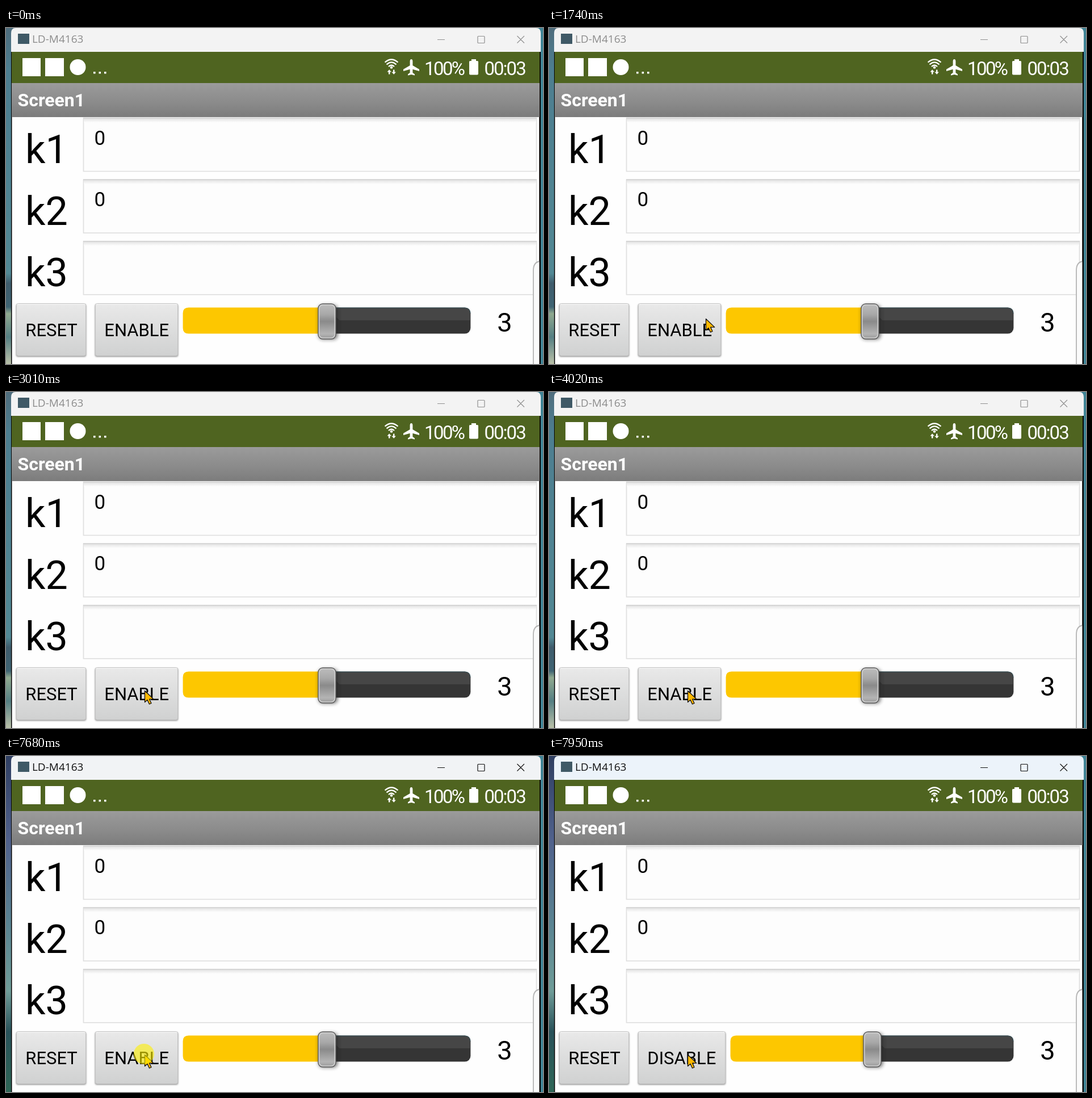
An HTML page for the animation above (8000 ms loop, 946x592 px).

```html
<!DOCTYPE html>
<html lang="en">
<head>
<meta charset="utf-8">
<title>Slider screen</title>
<style>
html, body { margin: 0; width: 100%; height: 100%; overflow: hidden; background: #fff; }
svg { display: block; width: 946px; height: 592px; }
text { font-family: Roboto, sans-serif; white-space: pre; }
.title { font: 19px "Open Sans", "Noto Sans", sans-serif; }
.status { font-size: 33px; fill: #fff; }
.label { font-size: 70px; }
.value { font-size: 35px; }
.caption { font-size: 31px; }
</style>
</head>
<body>
<svg id="stage" viewBox="0 0 946 592" xmlns="http://www.w3.org/2000/svg">
  <defs>
    <linearGradient id="deskIdle" x2="0" y2="1">
      <stop offset="0" stop-color="#4f6d7d"/><stop offset=".12" stop-color="#4d7e90"/>
      <stop offset=".73" stop-color="#528894"/><stop offset=".76" stop-color="#3f5c6c"/>
      <stop offset=".83" stop-color="#3f6473"/><stop offset=".85" stop-color="#8fa98f"/>
      <stop offset=".92" stop-color="#557f83"/><stop offset="1" stop-color="#b9c0a8"/>
    </linearGradient>
    <linearGradient id="deskLive" x2="0" y2="1">
      <stop offset="0" stop-color="#2f3f62"/><stop offset=".25" stop-color="#50618c"/>
      <stop offset=".5" stop-color="#5a8492"/><stop offset=".7" stop-color="#6f9c98"/>
      <stop offset=".82" stop-color="#29525a"/><stop offset="1" stop-color="#2f6656"/>
    </linearGradient>
    <linearGradient id="bar" x2="0" y2="1">
      <stop offset="0" stop-color="#9b9b9b"/><stop offset=".6" stop-color="#8a8a8a"/><stop offset="1" stop-color="#7c7c7c"/>
    </linearGradient>
    <linearGradient id="inset" x2="0" y2="1">
      <stop offset="0" stop-color="#e0e0e0"/><stop offset="1" stop-color="#fdfdfd"/>
    </linearGradient>
    <linearGradient id="button" x2="0" y2="1">
      <stop offset="0" stop-color="#e9e9e9"/><stop offset="1" stop-color="#d0d1d1"/>
    </linearGradient>
    <linearGradient id="knob" x2="0" y2="1">
      <stop offset="0" stop-color="#bdbdbd"/><stop offset=".3" stop-color="#a8a8a8"/>
      <stop offset=".5" stop-color="#8a8a8a"/><stop offset=".85" stop-color="#b4b4b4"/><stop offset="1" stop-color="#979797"/>
    </linearGradient>
    <filter id="soft" x="-50%" y="-20%" width="200%" height="140%"><feGaussianBlur stdDeviation="3"/></filter>
    <filter id="drop" x="-10%" y="-10%" width="120%" height="125%"><feGaussianBlur stdDeviation="1.4"/></filter>
  </defs>

  <rect width="946" height="592" fill="url(#deskIdle)"/>
  <rect id="live" width="946" height="592" fill="url(#deskLive)"/>
  <rect x="934" width="12" height="592" fill="#3f8496"/>
  <path id="frame" d="M9 43V9Q9 0 17 0H934Q942 0 942 9V43Z"/>
  <rect x="21" y="10" width="20" height="18" fill="#3f5966"/>
  <text class="title" id="name" x="46" y="26">LD-M4163</text>
  <path id="controls" d="M760 20.500H773M832 14.500H842Q843 14.500 843 15.500V25.500Q843 26.500 842 26.500H832Q831 26.500 831 25.500V15.500Q831 14.500 832 14.500ZM900.500 14L913 26.500M913 14L900.500 26.500" fill="none" stroke-width="1.200"/>

  <path d="M9 42H942V592H9Z" fill="#050505"/>
  <path d="M10.500 42H939.500V592H10.500Z" fill="#fefefe"/>
  <path d="M10 42H940V97H10Z" fill="#4f6420"/>
  <path d="M10 97H940V157H10Z" fill="url(#bar)"/>

  <g fill="#fff">
    <path d="M29 53H61V85H29ZM69 53H102V85H69Z"/>
    <circle cx="126.500" cy="69" r="14"/>
    <path d="M154 77h3.600v3.600h-3.600ZM163.500 77h3.600v3.600h-3.600ZM173 77h3.600v3.600h-3.600Z"/>
    <path d="M714 55q2.400 0 2.400 4v7l11.600 6.700v3.300l-11.600-3.300v6l3.600 2.700v2.100l-6-1.500-6 1.500v-2.100l3.600-2.700v-6l-11.600 3.300v-3.300l11.600-6.700v-7q0-4 2.400-4Z"/>
    <path d="M820 55h8v3h2.500q1.500 0 1.500 1.500v21q0 2-2 2h-12q-2 0-2-2v-21q0-1.500 1.500-1.500h2.500Z"/>
    <path d="M671.500 77.500l3.700-4.300 3.700 4.300h-2.500v4h-2.400v-4ZM679.500 77.500h2.500v-4h2.400v4h2.500l-3.700 4.300Z"/>
    <circle cx="679" cy="69.500" r="2.300"/>
    <path d="M667.500 60.500Q679 50.500 690.500 60.500M670.500 64.300Q679 56.500 687.500 64.300M674 68Q679 63 684 68" fill="none" stroke="#fff" stroke-width="2.300"/>
    <text x="20.500" y="138" font-size="32" font-weight="700">Screen1</text>
  </g>
  <text class="status" x="737" y="83" letter-spacing="-2.600">100%</text>
  <text class="status" x="842.500" y="83" letter-spacing="-2">00:03</text>

  <g id="fields"></g>
  <path d="M940 411Q929 413 929 427V592H940Z" fill="#fafafa"/>
  <path d="M940 411Q929 413 929 427V592" fill="none" stroke="#b4b4b4" stroke-width="1.800"/>
  <path d="M939.500 157V592H942V157Z" fill="#050505"/>

  <g id="buttons"></g>
  <g id="slider"></g>
  <text x="865.300" y="535.300" font-size="47">3</text>

  <path id="cursor" d="M.5 .5V20.500L5 16.400 8.500 24 12 22.400 8.700 15.100H15.800Z" fill="#ffb900" stroke="#111" stroke-width="1.300" stroke-linejoin="round"/>
  <circle id="press" cx="243" cy="525" r="18" fill="#fff000" opacity=".6"/>
</svg>
<script>
const LOOP = 8000, STEP = 67.5, ENTER = 980;
const FOCUS = 7680, RELEASE = 7880, TOGGLE = 7940;
const path = [
  [980, 784, 327], [1110, 620, 368], [1250, 477, 414], [1490, 345, 478],
  [1722, 276, 512], [2000, 254, 521], [2400, 244, 526]
];
const $ = id => document.getElementById(id);
const box = (x, y, w, h, attrs) => `<rect x="${x}" y="${y}" width="${w}" height="${h}" ${attrs}/>`;
const lerp = (a, b, k) => a + (b - a) * k;

const field = (name, value, i) => {
  const y = 158.5 + i * 108.6;
  return `<text class="label" x="34" y="${y + 79.5}">${name}</text>` +
    box(136.5, y, 798, 94, 'fill="#fdfdfd" stroke="#dedede" stroke-width="1.6"') +
    box(137, y, 797, 8, 'fill="url(#inset)"') +
    box(136, y - .5, 799, 1.5, 'fill="#d2d2d2"') +
    `<text class="value" x="155.5" y="${y + 47}">${value}</text>`;
};

const button = (x, w, caption) =>
  box(x, 487, w, 92, 'rx="3" fill="#555" opacity=".75" filter="url(#drop)"') +
  box(x + .5, 485.5, w - 1, 92, 'rx="3" fill="url(#button)" stroke="#c2c2c2"') +
  box(x + 2, 486, w - 4, 1.5, 'fill="#f4f4f4"') +
  `<text class="caption" x="${x + 16.3}" y="543">${caption}</text>`;

const slider = (left, knob) => {
  const mid = knob + 16, top = 492.6, low = top + 46, right = 818.4;
  return box(mid, top, right - mid, 46, 'rx="10" fill="#353535"') +
    `<path d="M${mid} ${top + 1}H${right - 10}Q${right - 1} ${top + 1} ${right - 1} ${top + 10}V515H${mid + 22}Z" fill="#464646"/>` +
    `<path d="M${mid} ${top + .5}H${right - 10}Q${right - .5} ${top + .5} ${right - .5} ${top + 10}" fill="none" stroke="#34535b"/>` +
    `<path d="M${mid} ${top}H${left + 10}Q${left} ${top} ${left} ${top + 10}V${low - 10}Q${left} ${low} ${left + 10} ${low}H${mid}Z" fill="#fdc700"/>` +
    box(knob + 1, 488, 34, 61, 'rx="8" fill="#222" opacity=".6" filter="url(#soft)"') +
    box(knob + .5, 486, 31, 62, 'rx="8" fill="url(#knob)" stroke="#5c5c5c" stroke-width="1.4"') +
    box(knob + 2.2, 487.7, 27.6, 58.6, 'rx="6.5" fill="none" stroke="#d0d0d0" stroke-width="1.6"');
};

let shown;
function setMode(on) {
  if (on === shown) return;
  shown = on;
  $("buttons").innerHTML = button(18, 123, "RESET") +
    (on ? button(157, 154, "DISABLE") : button(157, 146, "ENABLE"));
  $("slider").innerHTML = on ? slider(319.6, 553.5) : slider(311.6, 549.5);
}

function cursorAt(t) {
  const q = ENTER + Math.floor((t - ENTER) / STEP) * STEP;
  const i = path.findIndex(p => p[0] > q);
  if (i < 0) return path[path.length - 1].slice(1);
  const a = path[i - 1], b = path[i], k = (q - a[0]) / (b[0] - a[0]);
  return [lerp(a[1], b[1], k), lerp(a[2], b[2], k)];
}

const show = (id, on) => { $(id).style.display = on ? "" : "none"; };

function draw(t) {
  const live = t >= FOCUS, visible = t >= ENTER;
  const tint = live ? Math.min(1, Math.floor((t - FOCUS) / STEP + 1) / 4) : 0;
  show("live", live);
  show("press", live && t < RELEASE);
  show("cursor", visible);
  $("frame").setAttribute("fill",
    `rgb(${lerp(243, 236, tint)},243,${lerp(243, 250, tint)})`);
  $("name").setAttribute("fill", live ? "#111" : "#8c8c8c");
  $("controls").setAttribute("stroke", live ? "#111" : "#909090");
  if (visible) $("cursor").setAttribute("transform", `translate(${cursorAt(t)})`);
  setMode(t >= TOGGLE);
}

$("fields").innerHTML = [["k1", "0"], ["k2", "0"], ["k3", ""]].map((f, i) => field(...f, i)).join("");
const start = performance.now();
function tick() {
  draw((performance.now() - start) % LOOP);
  requestAnimationFrame(tick);
}
tick();
</script>
</body>
</html>
```
